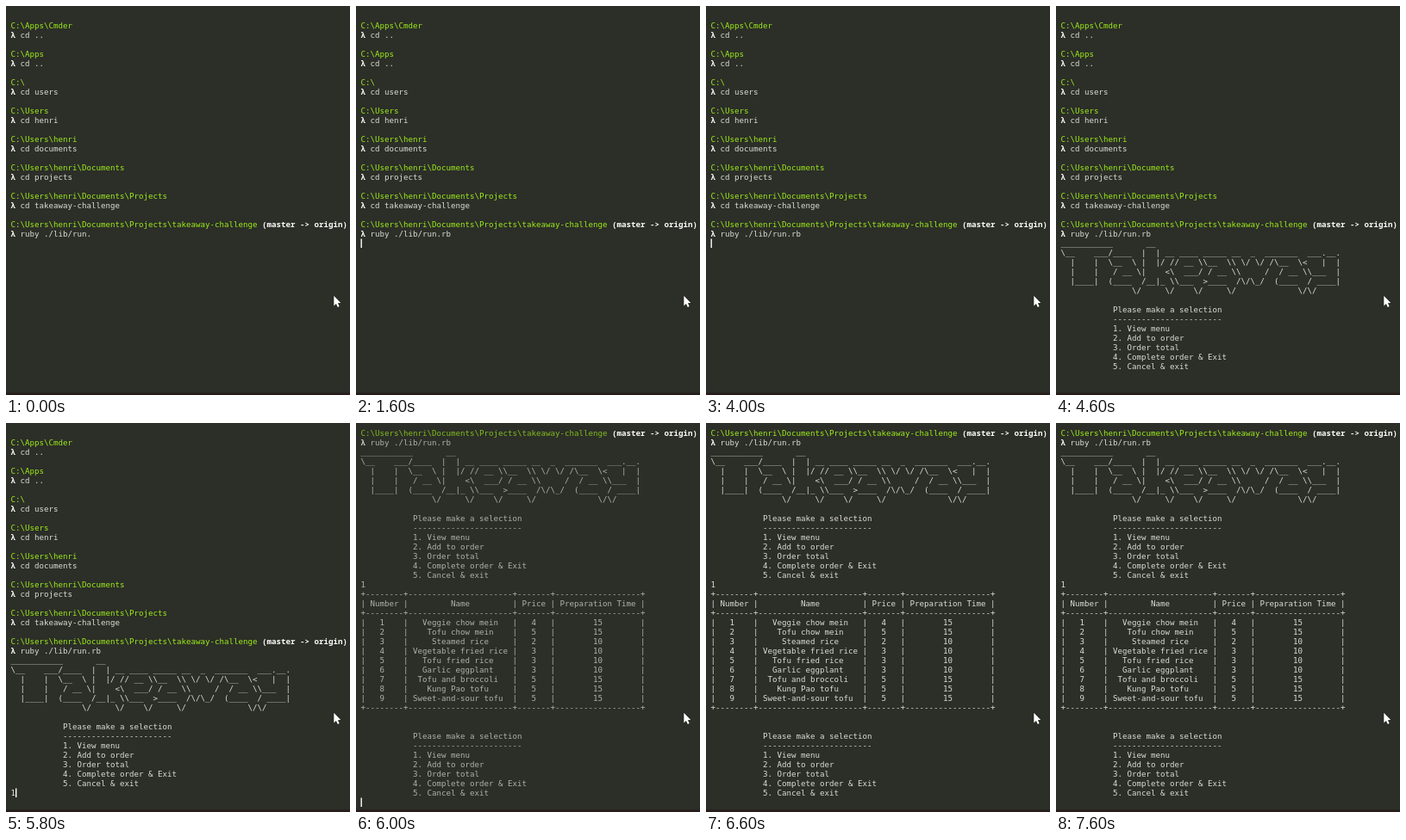
These frames come from a looping animation (399x452 px, 8000 ms). An HTML page with a canvas:

```html
<!DOCTYPE html>
<html lang="en">
<head>
<meta charset="utf-8">
<title>Terminal session</title>
<style>
  html, body { margin: 0; width: 100%; height: 100%; overflow: hidden; background: #2c2e28; }
  canvas { display: block; width: 399px; height: 452px; }
</style>
</head>
<body>
<canvas id="stage"></canvas>
<script>
const LOOP = 8000, STEP = 200;
const CELL = 5.5, LINE = 11, LEFT = 5.5, BASE = 26;
const GREEN = '#9cec1a', GREY = '#dcddd5', WHITE = '#fcfcf8';
const REGULAR = '9.135px "DejaVu Sans Mono", monospace';
const STRONG = '600 9.167px "Noto Sans Mono", monospace';
const COMMAND_ROW = 22, ANSWER_ROW = 37, SCROLL_ROWS = 22;

const canvas = document.getElementById('stage');
const ctx = canvas.getContext('2d');
const scale = window.devicePixelRatio || 1;
canvas.width = 399 * scale;
canvas.height = 452 * scale;

const home = 'C:\\Users\\henri';
const history = [
  ['C:\\Apps\\Cmder', 'cd ..'],
  ['C:\\Apps', 'cd ..'],
  ['C:\\', 'cd users'],
  ['C:\\Users', 'cd henri'],
  [home, 'cd documents'],
  [home + '\\Documents', 'cd projects'],
  [home + '\\Documents\\Projects', 'cd takeaway-challenge'],
  [home + '\\Documents\\Projects\\takeaway-challenge', '']
];
const branch = '(master -> origin)';

const banner = String.raw`
___________       __
\__    ___/____  |  | __ ____ _____ __  _  _______  ___.__.
  |    |  \__  \ |  |/ // __ \\__  \\ \/ \/ /\__  \<   |  |
  |    |   / __ \|    <\  ___/ / __ \\     /  / __ \\___  |
  |____|  (____  /__|_ \\___  >____  /\/\_/  (____  / ____|
               \/     \/    \/     \/             \/\/`.split('\n').slice(1);

const menu = ['Please make a selection', '-'.repeat(23), '1. View menu', '2. Add to order',
  '3. Order total', '4. Complete order & Exit', '5. Cancel & exit'].map(s => ' '.repeat(11) + s);

const widths = [6, 20, 5, 16];
const rule = '+' + widths.map(w => '-'.repeat(w + 2)).join('+') + '+';
const center = (s, w) => ' '.repeat((w - s.length) >> 1).concat(s).padEnd(w);
const tableRow = cells => '| ' + cells.map((c, i) => center(String(c), widths[i])).join(' | ') + ' |';
const dishes = [
  ['Veggie chow mein', 4, 15], ['Tofu chow mein', 5, 15], ['Steamed rice', 2, 10],
  ['Vegetable fried rice', 3, 10], ['Tofu fried rice', 3, 10], ['Garlic eggplant', 3, 10],
  ['Tofu and broccoli', 5, 15], ['Kung Pao tofu', 5, 15], ['Sweet-and-sour tofu', 5, 15]
];
const table = [rule, tableRow(['Number', 'Name', 'Price', 'Preparation Time']), rule,
  ...dishes.map((d, i) => tableRow([i + 1, ...d])), rule];

// Each character sits in its own terminal cell.
function put(text, row, col = 0, color = GREY, font = REGULAR) {
  ctx.font = font;
  ctx.fillStyle = color;
  [...text].forEach((ch, i) => {
    if (ch !== ' ') ctx.fillText(ch, LEFT + (col + i) * CELL, BASE + row * LINE);
  });
}

const putLines = (lines, row) => lines.forEach((s, i) => put(s, row + i));

function drawPointer() {
  const points = [[0, 0], [0, 11.6], [2.6, 9.2], [4.5, 13.2], [6.4, 12.3], [4.6, 8.5], [8, 8.2]];
  ctx.beginPath();
  points.forEach(([x, y]) => ctx.lineTo(380.3 + x, 336.8 + y));
  ctx.closePath();
  ctx.strokeStyle = '#151613';
  ctx.lineWidth = 1;
  ctx.stroke();
  ctx.fillStyle = '#fff';
  ctx.fill();
}

function draw(t) {
  const typed = 'ruby ./lib/run.' + (t < 200 ? '' : t < 400 ? 'r' : 'rb');
  const entered = t >= 1400, menuShown = t >= 4200, answered = t >= 5800, listed = t >= 6000;

  ctx.setTransform(scale, 0, 0, scale, 0, 0);
  ctx.fillStyle = '#2c2e28';
  ctx.fillRect(0, 0, 399, 452);

  ctx.save();
  if (listed) ctx.translate(0, -SCROLL_ROWS * LINE);
  ctx.globalAlpha = listed && t < 6200 ? 0.75 : 1;
  history.forEach(([path, command], i) => {
    put(path, i * 3, 0, GREEN);
    put('λ', i * 3 + 1, 0, WHITE, STRONG);
    put(command, i * 3 + 1, 2);
  });
  put(typed, COMMAND_ROW, 2);
  if (menuShown) {
    putLines(banner, 23);
    putLines(menu, 30);
  }
  if (answered) put('1', ANSWER_ROW);
  if (listed) {
    putLines(table, 38);
    putLines(menu, 53);
  }

  ctx.globalAlpha = 1;
  put(branch, 21, 53, WHITE, STRONG);
  const caretOn = (t - 430 + 1060) % 1060 < 530;
  if (caretOn) {
    const [row, col] = listed ? [60, 0] : answered ? [ANSWER_ROW, 1] : menuShown ? [ANSWER_ROW, 0]
      : entered ? [23, 0] : [COMMAND_ROW, 2 + typed.length];
    ctx.fillStyle = WHITE;
    ctx.fillRect(LEFT + col * CELL, 17.5 + row * LINE, 1.4, 10.5);
  }
  ctx.restore();

  ctx.fillStyle = '#271c1a';
  ctx.fillRect(0, 449.5, 399, 2.5);
  drawPointer();
}

function tick() {
  const t = performance.now() % LOOP;
  draw(Math.floor(t / STEP) * STEP);
  requestAnimationFrame(tick);
}
tick();
</script>
</body>
</html>
```
